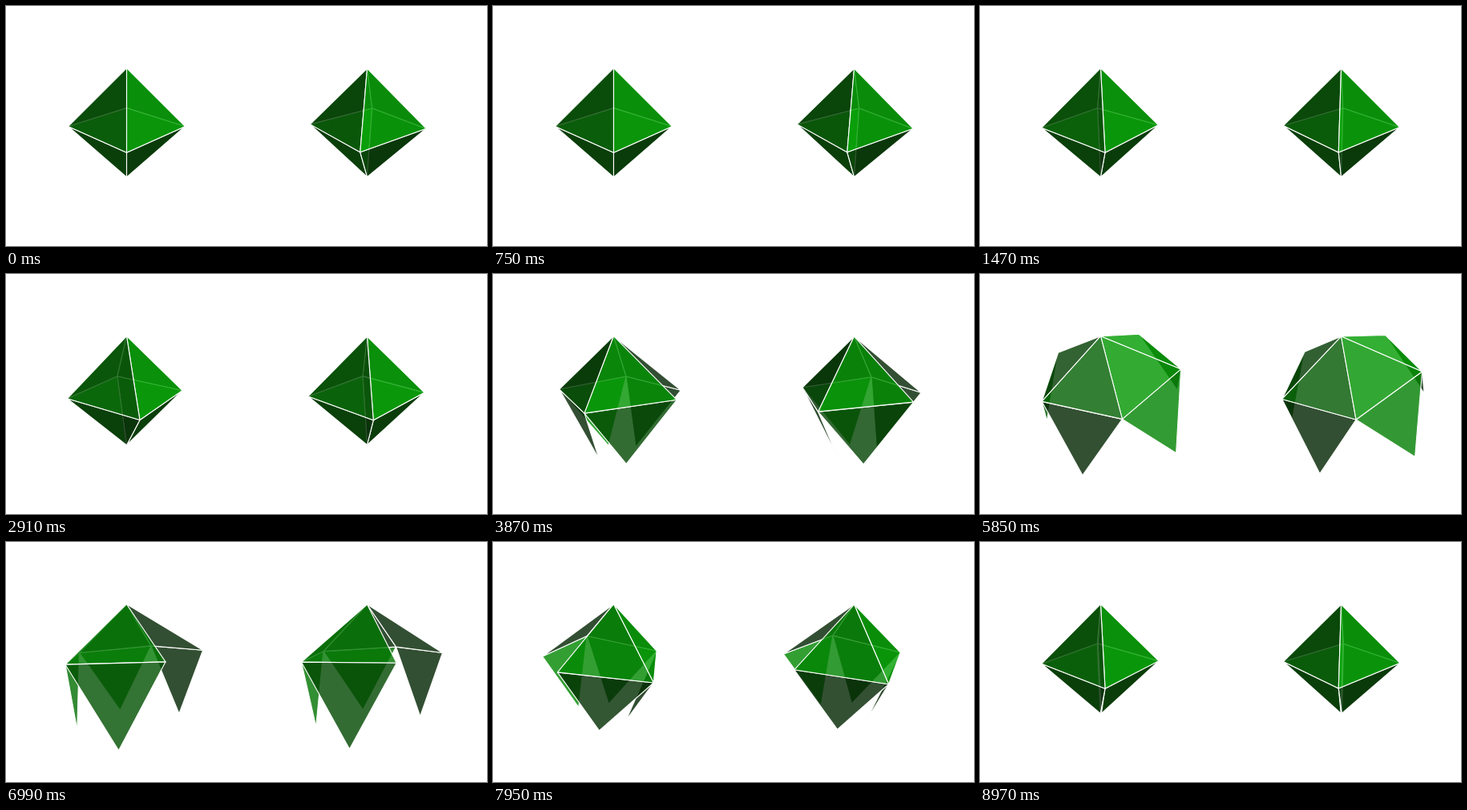
An HTML page with a canvas that plays this animation: 600 by 300 pixels, repeating every 9000 ms.

```html
<!DOCTYPE html>
<html lang="en">
<head>
<meta charset="utf-8">
<title>Unfolding octahedron, stereo pair</title>
<style>
  html, body { margin: 0; width: 100%; height: 100%; overflow: hidden; background: #fff; }
  canvas { display: block; }
</style>
</head>
<body>
<canvas id="stage" width="600" height="300"></canvas>
<script>
const ctx = document.getElementById('stage').getContext('2d');

const STEP = 30, STEPS = 300, TURN = 100;
const MAX_FOLD = Math.acos(1 / 3) / 2;
const RADIUS = 73, FOCAL = RADIUS * Math.hypot(2, 5);
const AMBIENT = 35, ALPHA = 0.8;
const LIGHT = [74, 97, 43];
const CENTER_Y = 150.5;
const EYES = [
  { x: 150.5, shift: 0 },
  { x: 450.5, shift: 0.5 }
];

const sub = (a, b) => a.map((v, i) => v - b[i]);
const dot = (a, b) => a[0] * b[0] + a[1] * b[1] + a[2] * b[2];
const cross = (a, b) => [
  a[1] * b[2] - a[2] * b[1],
  a[2] * b[0] - a[0] * b[2],
  a[0] * b[1] - a[1] * b[0]
];
const unit = a => {
  const len = Math.hypot(...a);
  return a.map(v => v / len);
};

// Rotates faces around the line from a to b
function hinge(faces, a, b, angle) {
  const k = unit(sub(b, a)), c = Math.cos(angle), s = Math.sin(angle);
  return faces.map(face => face.map(p => {
    const d = sub(p, a), kd = cross(k, d), along = dot(k, d) * (1 - c);
    return d.map((v, i) => a[i] + v * c + kd[i] * s + k[i] * along);
  }));
}

const TOP = [0, 1, 0], BOTTOM = [0, -1, 0];
const RING = [[-1, 0, 0], [0, 0, 1], [1, 0, 0], [0, 0, -1]];

// An upper face together with the lower face hanging from it
function wing(i, fold) {
  const a = RING[i], b = RING[(i + 1) % 4];
  return [[TOP, a, b], ...hinge([[BOTTOM, a, b]], b, a, fold)];
}

function buildNet(fold) {
  const outer = hinge(wing(2, fold), TOP, RING[2], fold);
  return [
    ...wing(0, fold),
    ...hinge([...wing(1, fold), ...outer], TOP, RING[1], fold),
    ...hinge(wing(3, fold), RING[0], TOP, fold)
  ];
}

function drawEye(net, spin, eye) {
  const h = Math.hypot(5, eye.shift), dist = Math.hypot(2, h);
  const camera = [0, 2, h], s = 2 / dist, c = h / dist;
  const angle = spin - Math.atan2(eye.shift, 5);
  const cs = Math.cos(angle), sn = Math.sin(angle);

  const project = ([x, y, z]) => {
    const scale = FOCAL / (dist - y * s - z * c);
    return [eye.x + x * scale, CENTER_Y - (y * c - z * s) * scale];
  };

  const faces = net.map(face => {
    const pts = face.map(([x, y, z]) => [x * cs + z * sn, y, z * cs - x * sn]);
    const mid = [0, 1, 2].map(i => (pts[0][i] + pts[1][i] + pts[2][i]) / 3);
    const view = sub(camera, mid);
    const normal = unit(cross(sub(pts[1], pts[0]), sub(pts[2], pts[0])));
    const side = dot(normal, view) < 0 ? -1 : 1;
    const green = AMBIENT + Math.max(0, side * dot(normal, LIGHT));
    return { pts, green, far: Math.hypot(...view) };
  });

  faces.sort((a, b) => b.far - a.far);
  for (const { pts, green } of faces) {
    ctx.beginPath();
    pts.forEach(p => ctx.lineTo(...project(p)));
    ctx.closePath();
    ctx.fillStyle = `rgba(0, ${Math.round(green)}, 0, ${ALPHA})`;
    ctx.fill();
    ctx.stroke();
  }
}

function draw(ms) {
  const n = Math.floor(ms / STEP) % STEPS;
  const spin = -2 * Math.PI * n / TURN;
  const open = Math.max(0, 1 - Math.abs(n - 200) / 100);
  const net = buildNet(open * MAX_FOLD);

  ctx.fillStyle = '#fff';
  ctx.fillRect(0, 0, 600, 300);
  ctx.strokeStyle = '#fff';
  ctx.lineWidth = 1.1;
  ctx.lineJoin = 'round';
  EYES.forEach(eye => drawEye(net, spin, eye));
}

const start = performance.now();
function tick() {
  draw(performance.now() - start);
  requestAnimationFrame(tick);
}
tick();
</script>
</body>
</html>
```
